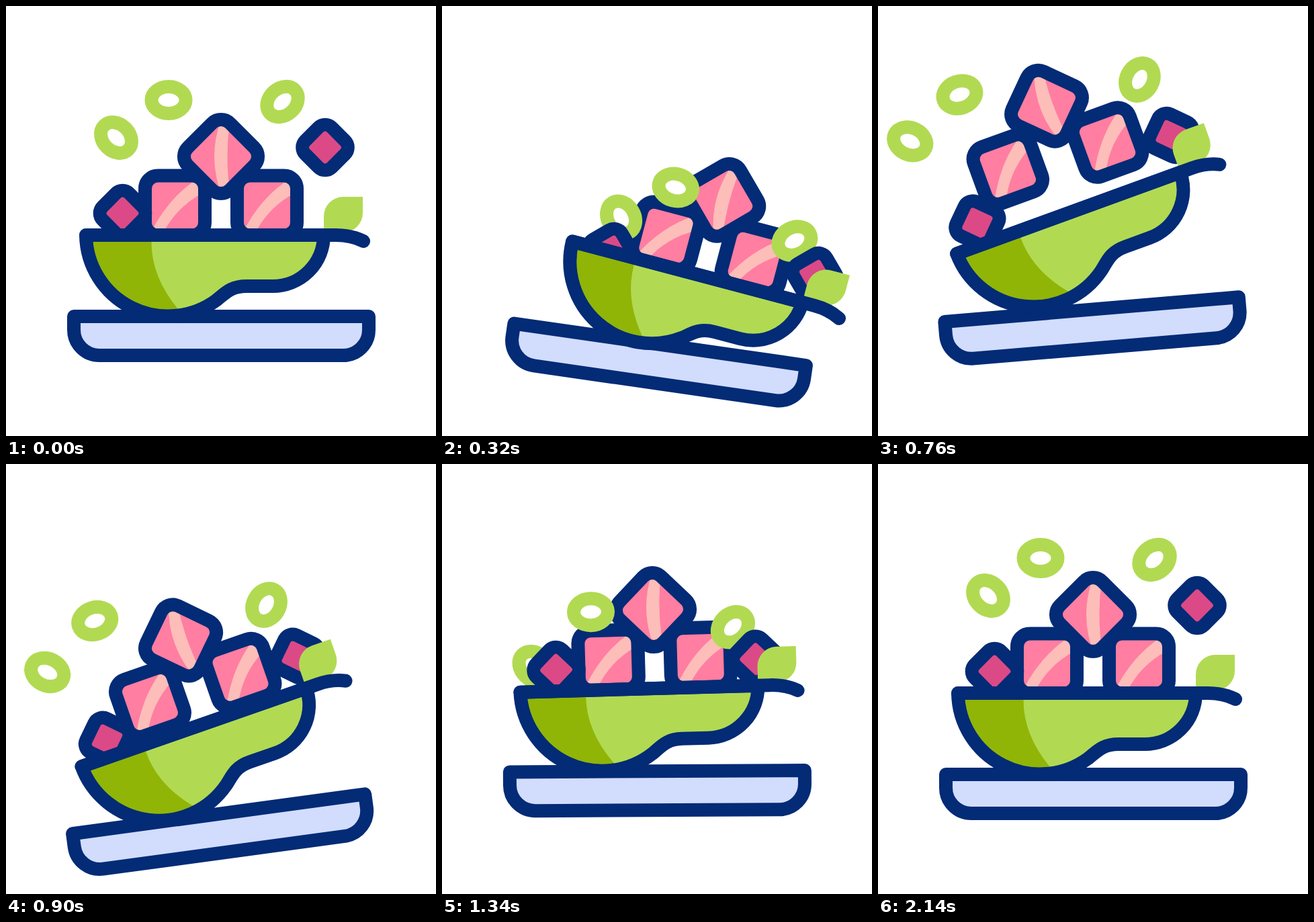
An HTML page without scripts for the animation above (2400 ms loop, 640 by 640 pixels).

```html
<!DOCTYPE html>
<html lang="en">
<head>
<meta charset="utf-8">
<title>Poke bowl</title>
<style>
  :root {
    --navy: #032b76;
    --lime: #b1da52;
    --in: cubic-bezier(.33, 0, .67, .5);
    --out: cubic-bezier(.33, .6, .67, 1);
    --both: cubic-bezier(.36, 0, .64, 1);
  }
  html, body { margin: 0; width: 100%; height: 100%; overflow: hidden; background: #fff; }
  svg { display: block; width: 100%; height: 100%; }

  .line { fill: none; stroke: var(--navy); stroke-width: 20; stroke-linecap: round; stroke-linejoin: round; }
  .ring { fill: #fff; stroke: var(--lime); stroke-width: 20; }
  .lime { fill: var(--lime); }
  .pink { fill: #ff7ea1; }
  .stripe { fill: #fdbdb9; }

  .plate-y, .plate-r, .bowl-x, .bowl-y, .bowl-r, .toss, .hop {
    animation: 2400ms var(--both) infinite;
  }
  .plate-y { animation-name: plate-y; }
  .plate-r { animation-name: plate-r; transform-origin: 320.5px 491px; }
  .bowl-x { animation-name: bowl-x; }
  .bowl-y { animation-name: bowl-y; }
  .bowl-r { animation-name: bowl-r; transform-origin: 241px 340px; }
  .toss { animation-name: toss; }
  .hop { animation-name: hop; }

  @keyframes plate-y {
    0% { translate: 0 0; }
    9.167% { translate: 0 57px; animation-timing-function: cubic-bezier(.33, 0, .67, .07); }
    13.333% { translate: 0 42px; animation-timing-function: cubic-bezier(.33, .24, .67, .76); }
    20% { translate: 0 -60.5px; animation-timing-function: var(--out); }
    23.75% { translate: 0 -80px; animation-timing-function: var(--in); }
    31.667% { translate: 0 -11px; animation-timing-function: cubic-bezier(.33, .44, .67, 1); }
    39.167% { translate: 0 64px; animation-timing-function: var(--in); }
    45% { translate: 0 30px; animation-timing-function: var(--out); }
    55% { translate: 0 -5px; }
    61.667%, 100% { translate: 0 0; }
  }
  @keyframes plate-r {
    0% { rotate: 0deg; }
    12.5% { rotate: 8.4deg; animation-timing-function: var(--in); }
    13.333% { rotate: 8.2deg; animation-timing-function: cubic-bezier(.33, .15, .67, .7); }
    20% { rotate: 2.05deg; animation-timing-function: cubic-bezier(.33, .5, .67, .85); }
    31.667% { rotate: -4.8deg; animation-timing-function: var(--out); }
    39.167% { rotate: -7.8deg; animation-timing-function: var(--in); }
    45% { rotate: -6.75deg; animation-timing-function: cubic-bezier(.33, .4, .67, 1); }
    58%, 100% { rotate: 0deg; }
  }
  @keyframes bowl-x {
    0% { translate: 0 0; }
    13.333% { translate: 71.4px 0; animation-timing-function: var(--in); }
    20% { translate: 22.4px 0; animation-timing-function: var(--out); }
    31.667% { translate: -9.5px 0; animation-timing-function: var(--out); }
    45% { translate: -15px 0; }
    60%, 100% { translate: 0 0; }
  }
  @keyframes bowl-y {
    0% { translate: 0 0; }
    9.167% { translate: 0 55px; animation-timing-function: cubic-bezier(.33, 0, .67, .07); }
    13.333% { translate: 0 41.2px; animation-timing-function: cubic-bezier(.33, .18, .67, .63); }
    20% { translate: 0 -92.2px; animation-timing-function: var(--out); }
    25% { translate: 0 -153px; animation-timing-function: cubic-bezier(.33, 0, .67, .37); }
    31.667% { translate: 0 -15.3px; animation-timing-function: linear; }
    32.3% { translate: 0 5px; animation-timing-function: cubic-bezier(.33, .45, .67, 1); }
    39.167% { translate: 0 75px; animation-timing-function: var(--in); }
    45% { translate: 0 39px; animation-timing-function: var(--out); }
    55% { translate: 0 -5px; }
    61.667%, 100% { translate: 0 0; }
  }
  @keyframes bowl-r {
    0% { rotate: 0deg; }
    12.5% { rotate: 15.3deg; animation-timing-function: var(--in); }
    13.333% { rotate: 14.9deg; animation-timing-function: cubic-bezier(.33, .15, .67, .75); }
    20% { rotate: -7.2deg; animation-timing-function: var(--out); }
    31.667% { rotate: -20deg; animation-timing-function: var(--out); }
    35.5% { rotate: -20.6deg; animation-timing-function: var(--in); }
    45% { rotate: -16.4deg; animation-timing-function: cubic-bezier(.33, .25, .67, 1); }
    59%, 100% { rotate: 0deg; }
  }
  /* loose toppings, offsets measured inside the tilting bowl */
  @keyframes toss {
    0% { translate: 0 0; }
    13.333% { translate: var(--dip); animation-timing-function: var(--in); }
    20% { translate: var(--lift); animation-timing-function: cubic-bezier(.33, .33, .67, 1); }
    31.667% { translate: var(--fly); }
    45% { translate: var(--fall); animation-timing-function: var(--out); }
    60%, 74.167% { translate: var(--rest); }
    89.167%, 100% { translate: 0 0; }
  }
  @keyframes hop {
    0%, 14% { translate: 0 0; }
    20% { translate: var(--lift, 0 0); animation-timing-function: var(--in); }
    31.667% { translate: var(--fly); animation-timing-function: cubic-bezier(.4, 0, .67, .6); }
    39%, 100% { translate: 0 0; }
  }
</style>
</head>
<body>
<svg viewBox="0 0 640 640">
  <defs>
    <rect id="box" x="-44.5" y="-44.5" width="89" height="89" rx="19"/>
    <g id="cube">
      <use href="#box" class="pink"/>
      <path class="stripe" d="M-37 42Q-10-12 34-40H42V-19Q2 2-18 42Z"/>
      <use href="#box" class="line"/>
    </g>
    <g id="bit" transform="rotate(45)">
      <rect class="line" style="fill:#db4a86" x="-28" y="-28" width="56" height="56" rx="14"/>
    </g>
    <ellipse id="ring" class="ring" rx="25.5" ry="20"/>
    <path id="hull" d="M119 341A122 122 0 0 0 313 438C326 428 334 417 358 417H397A76 76 0 0 0 473 341Z"/>
  </defs>

  <g class="plate-y"><g class="plate-r">
    <path class="line" style="fill:#d2dcfd" d="M101 462H540V482A38 38 0 0 1 502 520H139A38 38 0 0 1 101 482Z"/>
  </g></g>

  <g class="bowl-x"><g class="bowl-y"><g class="bowl-r">
    <g class="hop" style="--lift:-11px -10px; --fly:-18px -48px">
      <use href="#cube" x="251.5" y="297"/>
    </g>
    <g class="hop" style="--fly:-2px -35px">
      <use href="#cube" x="388.5" y="297"/>
    </g>
    <g class="hop" style="--fly:0px -44px">
      <g transform="translate(320 224)">
        <use href="#box" class="pink" transform="rotate(45)"/>
        <path class="stripe" d="M-1-52Q-19 0-1 52H13Q6 0 13-52Z"/>
        <use href="#box" class="line" transform="rotate(45)"/>
      </g>
    </g>

    <g class="toss" style="--dip:16px 92px; --lift:-3px 63px; --fly:-53px -36px; --fall:-38px 42px; --rest:-22px 111px">
      <use href="#ring" transform="translate(164 196) rotate(45)"/>
    </g>
    <g class="toss" style="--dip:5px 84px; --lift:-7px 59px; --fly:-38px -20px; --fall:-26px 36px; --rest:-14px 87px">
      <use href="#ring" transform="translate(242 140)"/>
    </g>
    <g class="toss" style="--dip:27px 113px; --lift:33px 98px; --fly:52px 48px; --fall:38px 82px; --rest:26px 112px">
      <use href="#ring" transform="translate(411.5 142.5) rotate(-42)"/>
    </g>

    <g class="toss" style="--dip:4px 32px; --lift:-10px -2px; --fly:-10px 0px; --fall:1px 18px; --rest:0px 0px">
      <use href="#bit" transform="translate(173.5 308.5)"/>
    </g>
    <g class="toss" style="--dip:6px 87px; --lift:16px 50px; --fly:4px 74px; --fall:-4px 92px; --rest:-4px 91px">
      <use href="#bit" transform="translate(475 210.5)"/>
    </g>

    <path class="lime" d="M531 284H502A29 29 0 0 0 473 313V337H502A29 29 0 0 0 531 308Z"/>
    <use href="#hull" class="lime"/>
    <path fill="#90b507" d="M119 341A122 122 0 0 0 241 462H262V458Q212 402 217 341Z"/>
    <use href="#hull" class="line"/>
    <path class="line" d="M119 341H491Q514 341 532 350"/>
  </g></g></g>
</svg>
</body>
</html>
```
